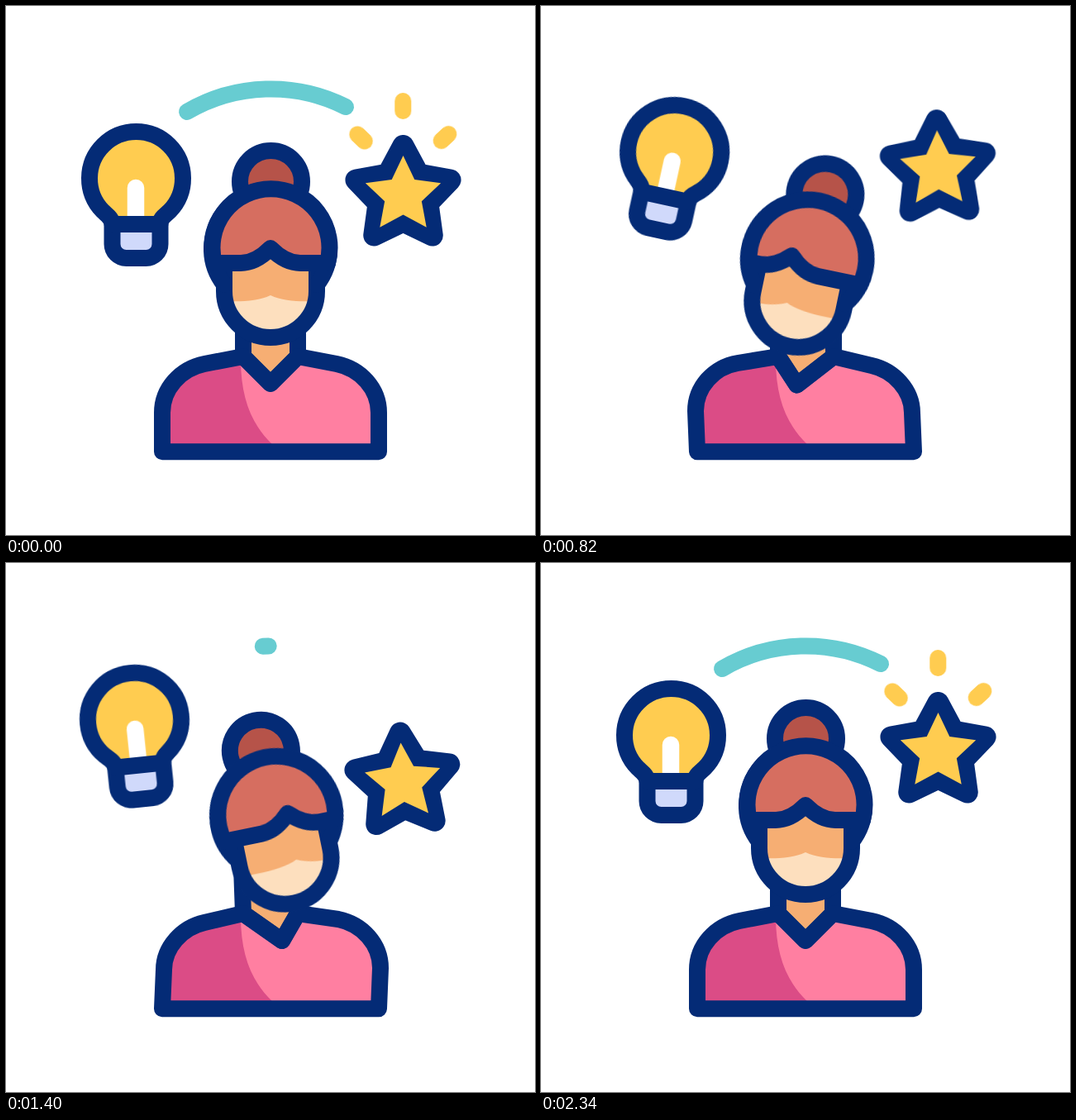
Recreate the animation shown at these times as an HTML page. Size 640 px wide and 640 px high, loop 2.4 s.

```html
<!DOCTYPE html>
<html lang="en">
<head>
<meta charset="utf-8">
<title>Ideas and skills</title>
<style>
  html, body { margin: 0; width: 100%; height: 100%; overflow: hidden; background: #fff; }
  svg { display: block; width: 100%; height: 100%; }

  .line { fill: none; stroke: #042b76; stroke-width: 20; stroke-linecap: round; stroke-linejoin: round; }
  .skin { fill: #f6ae73; }
  .pink { fill: #ff7fa1; }
  .gold { fill: #ffcc50; }

  .bulb, .star, .head, .bun, .neck, .torso, .fringe, .cheeks, .arc, .spark {
    animation: 2.4s infinite both cubic-bezier(.65, 0, .35, 1);
  }

  /* bulb and star share one bounce, the star follows later */
  .bulb, .star {
    animation-name: hop, wag;
    animation-timing-function: cubic-bezier(.65, 0, .35, 1), cubic-bezier(.36, 0, .64, 1);
  }
  .bulb { transform-origin: 157.5px 228px; }
  .star { transform-origin: 480.5px 229px; animation-delay: .18s; }
  @keyframes hop {
    0%, 90%, 100% { translate: 0 0; }
    15% { translate: 0 53px; }
    30.9% { translate: 0 -38px; }
    45% { translate: 0 54px; }
    60% { translate: 0 -20px; }
    75% { translate: 0 12px; }
  }
  @keyframes wag {
    0%, 90%, 100% { rotate: 0deg; }
    17% { rotate: -17.5deg; }
    36% { rotate: 13deg; }
    56% { rotate: -6.5deg; }
    72% { rotate: 4deg; }
  }

  /* lean right, lean left, settle */
  .head { transform-origin: 320.5px 293px; animation-name: lean; }
  @keyframes lean {
    0%, 97.5%, 100% { translate: 0 0; rotate: 0deg; }
    33.33% { translate: 2px 13px; rotate: 11.8deg; }
    58.33% { translate: 7px 12.5px; rotate: -11.6deg; animation-timing-function: cubic-bezier(.5, 0, .3, 1); }
  }
  .bun { animation-name: bun; }
  @keyframes bun {
    0%, 97.5%, 100% { translate: 0 0; }
    33.33% { translate: 5px 0; }
    58.33% { translate: -3px 0; animation-timing-function: cubic-bezier(.5, 0, .3, 1); }
  }
  .fringe { animation-name: fringe; }
  @keyframes fringe {
    0%, 97.5%, 100% { d: path("M252 311H284C300 311 312 301 320 293C328 301 340 311 356 311H389A71 71 0 1 0 252 311Z"); }
    33.33% { d: path("M252 311H265C281 311 293 301 301 293C309 301 321 311 337 311H389A71 71 0 1 0 252 311Z"); }
    58.33% {
      d: path("M252 311H298C314 311 326 301 334 293C342 301 354 311 370 311H389A71 71 0 1 0 252 311Z");
      animation-timing-function: cubic-bezier(.5, 0, .3, 1);
    }
  }
  .cheeks { animation-name: cheeks; }
  @keyframes cheeks {
    0%, 97.5%, 100% { d: path("M265 357C285 358 305 357 320 350C335 357 355 358 375 357A56 56 0 0 1 265 357Z"); }
    33.33% { d: path("M265 357C277 358 292 357 307 350C322 357 347 358 375 357A56 56 0 0 1 265 357Z"); }
    58.33% {
      d: path("M265 357C293 358 318 357 333 350C348 357 363 358 375 357A56 56 0 0 1 265 357Z");
      animation-timing-function: cubic-bezier(.5, 0, .3, 1);
    }
  }
  .neck { animation-name: neck; }
  @keyframes neck {
    0%, 97.5%, 100% { d: path("M287 368L287 424L320 457L353 424L353 368"); }
    33.33% { d: path("M287 368L287 424L309.5 458.5L354 424L354 368"); }
    58.33% {
      d: path("M285 368L287 424L334 457L353 424L353 368");
      animation-timing-function: cubic-bezier(.5, 0, .3, 1);
    }
  }
  .torso { animation-name: torso; }
  @keyframes torso {
    0%, 97.5%, 100% { d: path("M287 424L240 433C211 439 189 463 189 492L189 539.2L451 539.2L451 492C451 463 429 439 400 433L353 424L320 457Z"); }
    33.33% { d: path("M287 424L238 432C209 437 187 461 187 490L189 539.2L451 539.2L449 492C449 465 427 441 400 435L354 424L309.5 458.5Z"); }
    58.33% {
      d: path("M287 424L240 435C213 441 191 465 191 492L189 539.2L451 539.2L453 490C453 461 431 437 402 431L353 424L334 457Z");
      animation-timing-function: cubic-bezier(.5, 0, .3, 1);
    }
  }

  .arc { fill: none; stroke: #67ccd1; stroke-width: 20; stroke-linecap: round; animation-name: arc; }
  @keyframes arc {
    0% { stroke-dasharray: 1 2; stroke-dashoffset: 0; opacity: 1; animation-timing-function: cubic-bezier(.5, .1, .8, .7); }
    24% { stroke-dasharray: 0 2; stroke-dashoffset: -.5; opacity: 1; }
    24.01%, 57.9% { stroke-dasharray: 0 2; stroke-dashoffset: -.5; opacity: 0; }
    57.91% { stroke-dasharray: 0 2; stroke-dashoffset: -.5; opacity: 1; animation-timing-function: cubic-bezier(.22, .65, .33, 1); }
    97.5%, 100% { stroke-dasharray: 1 2; stroke-dashoffset: 0; opacity: 1; }
  }
  .spark { fill: none; stroke: #ffcc50; stroke-width: 20; stroke-linecap: round; animation-name: spark; }
  @keyframes spark {
    0% { stroke-dasharray: 12 99; stroke-dashoffset: -23; opacity: 1; animation-timing-function: cubic-bezier(.5, .1, .8, .7); }
    10% { stroke-dasharray: 0 99; stroke-dashoffset: -65; opacity: 1; }
    10.01% { stroke-dasharray: 0 99; stroke-dashoffset: -65; opacity: 0; }
    67.8% { stroke-dasharray: 0 99; stroke-dashoffset: 0; opacity: 0; }
    67.81% { stroke-dasharray: 0 99; stroke-dashoffset: 0; opacity: 1; animation-timing-function: cubic-bezier(.22, .65, .33, 1); }
    80%, 100% { stroke-dasharray: 12 99; stroke-dashoffset: -23; opacity: 1; }
  }
</style>
</head>
<body>
<svg viewBox="0 0 640 640">
  <path class="arc" pathLength="1" d="M219 128A201 201 0 0 1 411 122"/>

  <g class="bulb">
    <path class="gold" d="M128.5 264C128 256 122 253 117 248A56.5 56.5 0 1 1 198 248C193 253 186.5 256 186.5 264Z"/>
    <path d="M157 220V262" stroke="#fff" stroke-width="20.5" stroke-linecap="round"/>
    <path class="line" style="fill:#d0d9fb" d="M128.5 264H186.5V288A17 17 0 0 1 169.5 305H145.5A17 17 0 0 1 128.5 288Z"/>
    <path class="line" d="M128.5 264C128 256 122 253 117 248A56.5 56.5 0 1 1 198 248C193 253 186.5 256 186.5 264Z"/>
  </g>

  <g class="star">
    <polygon class="line" id="rim" style="fill:#042b76;stroke-width:26"/>
    <polygon class="gold" id="core"/>
  </g>
  <path class="spark" pathLength="65" transform="translate(480.3 150)" d="M0 0V-65"/>
  <path class="spark" pathLength="65" transform="translate(509.8 178.8) rotate(47)" d="M0 0V-65"/>
  <path class="spark" pathLength="65" transform="translate(450.4 179.6) rotate(-46)" d="M0 0V-65"/>

  <path class="neck skin"/>
  <path class="torso pink"/>
  <path fill="#db4c86" d="M284 428C284 475 298 508 323 531H189V492C189 463 211 439 240 433Z"/>
  <path class="neck line"/>
  <path class="torso line"/>

  <g class="head">
    <g class="bun"><circle class="line" style="fill:#b65349" cx="320.5" cy="212.5" r="37.5"/></g>
    <path class="skin" d="M264 300V345A56 56 0 0 0 376 345V300Z"/>
    <path class="cheeks" fill="#fddfbe"/>
    <path class="line" d="M264 311V345A56 56 0 0 0 376 345V311"/>
    <path class="line" d="M264 337A71 71 0 1 1 376 337"/>
    <path class="fringe line" style="fill:#d66e60"/>
  </g>
</svg>
<script>
  // five-pointed star with tip radius R and notch radius r
  const star = (R, r) => Array.from({ length: 10 }, (_, i) => {
    const a = i * Math.PI / 5, d = i % 2 ? r : R;
    return (480.5 + d * Math.sin(a)).toFixed(2) + ',' + (229 - d * Math.cos(a)).toFixed(2);
  }).join(' ');
  document.getElementById('rim').setAttribute('points', star(60, 31.5));
  document.getElementById('core').setAttribute('points', star(48, 23.5));
</script>
</body>
</html>
```
